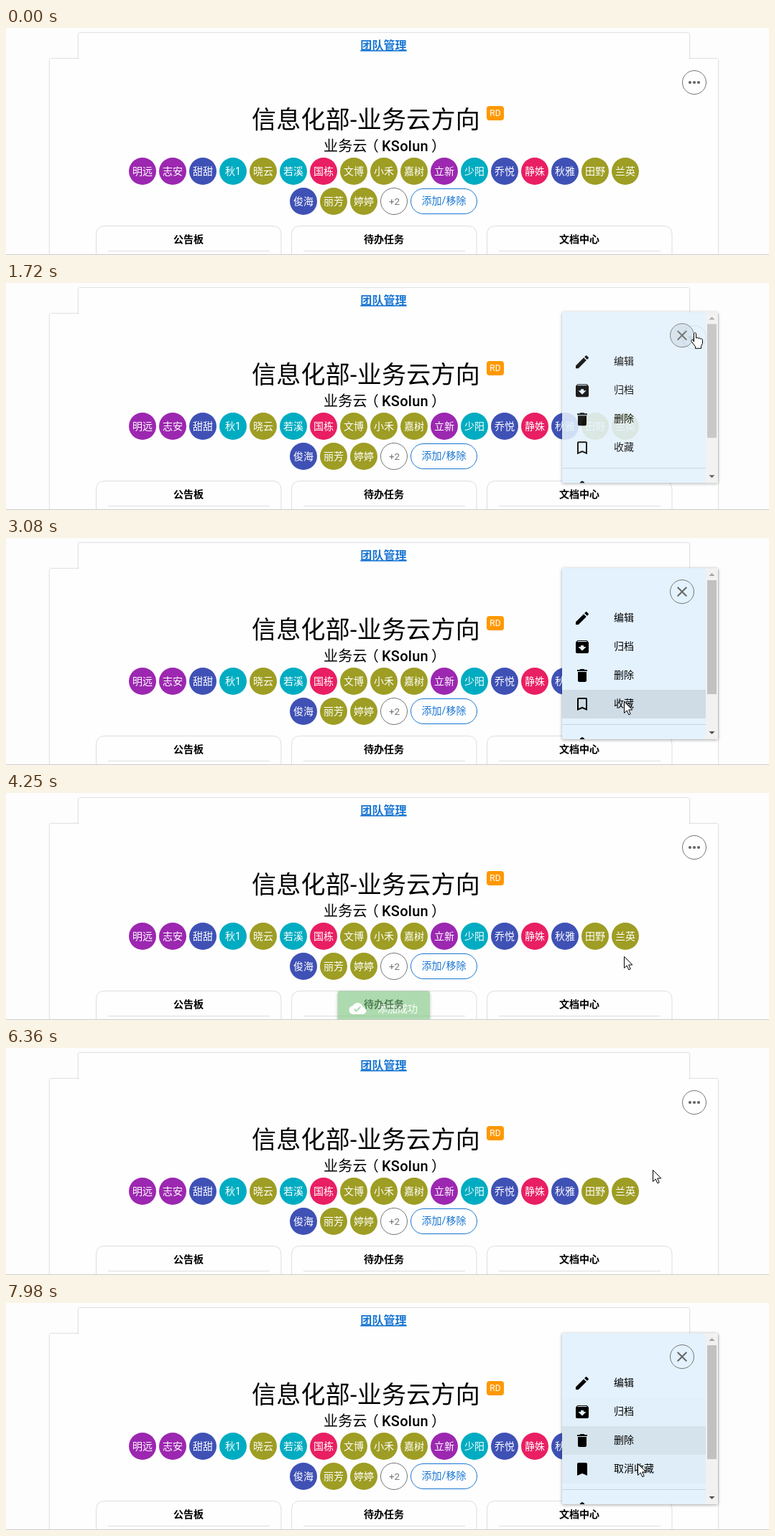
Write an HTML page that moves like this. It is 1062 px wide and 317 px high and loops after 8000 ms.

```html
<!DOCTYPE html>
<html lang="zh-CN">
<head>
<meta charset="utf-8">
<title>团队管理</title>
<style>
html, body { margin: 0; width: 100%; height: 100%; overflow: hidden; background: #fdfdfd; }
svg { display: block; width: 100%; height: 100%; font-family: Roboto, "Noto Sans CJK SC", "Noto Sans CJK", sans-serif; }
.sheet { filter: drop-shadow(0 0 1px rgba(0,0,0,.3)); }
.float { filter: drop-shadow(0 1px 2px rgba(0,0,0,.35)); }
</style>
</head>
<body>
<svg id="stage" viewBox="0 0 1062 317"></svg>
<script>
const stage = document.getElementById('stage');

const PATHS = {
  edit: 'M3 17.25V21h3.75L17.81 9.94l-3.75-3.75zM20.71 7.04c.39-.39.39-1.02 0-1.41l-2.34-2.34c-.39-.39-1.02-.39-1.41 0l-1.83 1.83 3.75 3.75z',
  archive: 'M20.54 5.23l-1.39-1.68C18.88 3.21 18.47 3 18 3H6c-.47 0-.88.21-1.16.55L3.46 5.23C3.17 5.57 3 6.02 3 6.5V19c0 1.1.9 2 2 2h14c1.1 0 2-.9 2-2V6.5c0-.48-.17-.93-.46-1.27zM12 17.5L6.5 12H10v-2h4v2h3.5zM5.12 5l.81-1h12l.94 1z',
  trash: 'M6 19c0 1.1.9 2 2 2h8c1.1 0 2-.9 2-2V7H6zM19 4h-3.5l-1-1h-5l-1 1H5v2h14z',
  mark: 'M17 3H7c-1.1 0-2 .9-2 2v16l7-3 7 3V5c0-1.1-.9-2-2-2z',
  markHole: 'M17 18l-5-2.18L7 18V5h10z',
  close: 'M19 6.41L17.59 5 12 10.59 6.41 5 5 6.41 10.59 12 5 17.59 6.41 19 12 13.41 17.59 19 19 17.59 13.41 12z',
  cloud: 'M19.35 10.04C18.67 6.59 15.64 4 12 4 9.11 4 6.6 5.64 5.35 8.04 2.34 8.36 0 10.91 0 14c0 3.31 2.69 6 6 6h13c2.76 0 5-2.24 5-5 0-2.64-2.05-4.78-4.65-4.96zM10 17l-3.5-3.5 1.41-1.41L10 14.17 15.18 9l1.41 1.41z'
};

const COLORS = { p: '#9c27b0', i: '#3f51b5', c: '#00acc1', o: '#9e9d24', r: '#e91e63' };
const MEMBERS = '明远p 志安p 甜甜i 秋1c 晓云o 若溪c 国栋r 文博o 小禾o 嘉树o 立新p 少阳c 乔悦i 静姝r 秋雅i 田野o 兰英o 俊海i 丽芳o 婷婷o'.split(' ');

const text = (s, x, cy, size, fill = '#000', more = 'text-anchor="middle"') =>
  `<text x="${x}" y="${cy + size * .37}" font-size="${size}" fill="${fill}" ${more}>${s}</text>`;
const circle = (x, y, r, more) => `<circle cx="${x}" cy="${y}" r="${r}" ${more}/>`;
const rect = (x, y, w, h, more) => `<rect x="${x}" y="${y}" width="${w}" height="${h}" ${more}/>`;
const icon = (d, x, y, fill = '#000', id = '') =>
  `<path ${id} d="${d}" fill="${fill}" fill-rule="evenodd" transform="translate(${x - 12} ${y - 12})"/>`;
const line = (x1, x2, y, color) => rect(x1, y, x2 - x1, 1, `fill="${color}"`);

function member(entry, n) {
  const x = n < 17 ? 190 + 42 * n : 414 + 42 * (n - 17);
  const y = n < 17 ? 200 : 242;
  return circle(x, y, 19, `fill="${COLORS[entry.at(-1)]}"`) +
    text(entry.slice(0, -1), x, y - .5, 14, '#fff');
}

function card(title, n) {
  const x = 125.5 + 272 * n;
  return `<path d="M${x} 317V288.5q0-12 12-12h233.5q12 0 12 12V317" fill="#fefefe" stroke="#ddd"/>` +
    text(title, x + 128.5, 295, 14, '#000', 'text-anchor="middle" font-weight="700"') +
    line(x + 16.5, x + 241.5, 311, '#ddd');
}

const page =
  '<path class="sheet" d="M61 330V45q0-2 2-2H101V9q0-2 2-2H949q2 0 2 2V43H989q2 0 2 2V330z" fill="#fefefe"/>' +
  text('团队管理', 525.5, 24, 16.1, '#1976d2', 'text-anchor="middle" font-weight="700" text-decoration="underline"') +
  circle(958, 76, 16.5, 'id="more" fill="#000" fill-opacity="0" stroke="#757575"') +
  [952, 958, 964].map(x => circle(x, 76, 2.1, 'fill="#666"')).join('') +
  text('信息化部-业务云方向', 342, 127.5, 34, '#000', 'letter-spacing=".25"') +
  rect(669, 109, 24, 20, 'rx="4" fill="#ff9800"') +
  text('RD', 681, 119, 12, '#fff') +
  text('业务云<tspan dx="-4">（</tspan><tspan dx="4" font-weight="500">KSolun</tspan><tspan dx="4">）</tspan>',
    442, 165, 20, '#000', 'letter-spacing=".25"') +
  MEMBERS.map(member).join('') +
  circle(540, 242, 18.5, 'fill="none" stroke="#757575"') +
  text('+2', 540.5, 242.5, 13.5, '#757575') +
  rect(563.5, 224.5, 92, 35, 'rx="17.5" fill="none" stroke="#1976d2"') +
  text('添加/移除', 609.5, 241, 14, '#1976d2') +
  ['公告板', '待办任务', '文档中心'].map(card).join('');

const ROWS = [['编辑', PATHS.edit], ['归档', PATHS.archive], ['删除', PATHS.trash], ['收藏', PATHS.mark]];
const rowTop = n => 92 + 40 * n;

const menu =
  rect(774, 42, 217, 239, 'class="float" rx="2" fill="#e3f2fd"') +
  circle(941, 75, 16.5, 'id="close" fill="#000" fill-opacity="0" stroke="#757575"') +
  icon(PATHS.close, 941, 75, '#666') +
  ROWS.map(([name, d], n) =>
    rect(774, rowTop(n), 200, 40, `id="row${n}"`) +
    icon(d, 802, rowTop(n) + 20, '#000', n == 3 ? 'id="mark"' : '') +
    text(name, 846, rowTop(n) + 19, 14, '#000', n == 3 ? 'id="markText"' : '')).join('') +
  line(774, 974, 260, '#c6d3dd') +
  '<path d="M798.5 281q1-2 3.5-3 2.5 1 3.5 3z"/>' +
  rect(974, 42, 17, 239, 'fill="#f1f1f1"') +
  rect(976, 59, 13, 159, 'fill="#c1c1c1"') +
  '<path d="M978.5 53l4-4 4 4z" fill="#a3a3a3"/><path d="M978.5 270l4 4 4-4z" fill="#505050"/>';

const toast =
  rect(461.5, 258.5, 128.5, 48.5, 'class="float" rx="4" fill="#81c784"') +
  icon(PATHS.cloud, 489.5, 283, '#fff') +
  text('添加成功', 517, 282.5, 14, '#fff', '');

stage.innerHTML = page +
  `<g id="menu">${menu}</g><g id="toast">${toast}</g>` +
  line(0, 1062, 316, '#ccc') +
  `<g id="cursor" fill="#fff" stroke="#000" stroke-linejoin="round">
    <path id="arrow" d="M.5 .5V16.5L4.2 13l2.6 5.8 2.4-1L6.7 12H11.8z"/>
    <path id="hand" transform="translate(-6 0)" d="M4.5 13V2c0-2 3-2 3 0v6c0-1 3-1 3 .5 0-1 3-.7 3 .8 0-1 3-.6 3 1v5l-2 4v3H6.5v-2.5L1 12.5c-1-2 1-3 2-2z"/>
  </g>`;

const el = id => document.getElementById(id);
const set = (id, name, value) => el(id).setAttribute(name, value);
const easeOut = p => 1 - (1 - Math.min(1, Math.max(0, p))) ** 3;

// time, x, y of the pointer
const TRAIL = [
  [480, 630, 318], [650, 730, 245], [850, 850, 155], [1000, 925, 95], [1130, 959, 69],
  [1860, 959, 69], [2050, 932, 110], [2200, 900, 155], [2350, 877, 190], [2450, 866, 214], [2560, 860, 228],
  [6100, 860, 228], [6230, 876, 205], [6360, 900, 170], [6540, 929, 132], [6700, 950, 95], [6840, 959, 74],
  [7430, 959, 74], [7560, 935, 120], [7690, 908, 168], [7920, 884, 212], [7980, 879, 224]
];

function pointer(t) {
  const n = TRAIL.findIndex(k => k[0] > t);
  if (n == 0) return [630, 340];
  if (n < 0) return TRAIL.at(-1).slice(1);
  const [a, b] = [TRAIL[n - 1], TRAIL[n]];
  const p = (t - a[0]) / (b[0] - a[0]);
  return [a[1] + (b[1] - a[1]) * p, a[2] + (b[2] - a[2]) * p];
}

const menuLevel = t =>
  t < 3550 ? easeOut((t - 1570) / 300) :
  t < 7000 ? 1 - easeOut((t - 3550) / 300) : easeOut((t - 7130) / 300);
const toastLevel = t => t < 5750 ? easeOut((t - 4020) / 800) : 1 - easeOut((t - 5750) / 800);

// share of the last 300 ms that the pointer spent on a row
function hoverLevel(n, t) {
  let hits = 0;
  for (let k = 1; k <= 10; k++) {
    const y = pointer(t - 30 * k)[1];
    if (y >= rowTop(n) && y < rowTop(n + 1)) hits++;
  }
  return hits / 10;
}

function place(id, level, shift) {
  set(id, 'opacity', level);
  set(id, 'transform', `translate(0 ${shift * (1 - level)})`);
}

function draw(t) {
  const [x, y] = pointer(t);
  const open = menuLevel(t);
  place('menu', open, -15);
  place('toast', toastLevel(t), 50);
  ROWS.forEach((_, n) => set('row' + n, 'fill-opacity', .09 * hoverLevel(n, t)));

  const saved = t > 4000;
  set('mark', 'd', PATHS.mark + (saved ? '' : PATHS.markHole));
  el('markText').textContent = saved ? '取消收藏' : '收藏';

  const onMore = open == 0 && Math.hypot(x - 958, y - 76) < 17;
  const onClose = open > 0 && Math.hypot(x - 941, y - 75) < 21;
  set('more', 'fill-opacity', onMore ? .07 : 0);
  set('close', 'fill-opacity', onClose ? .07 : 0);
  set('hand', 'opacity', +(onMore || onClose));
  set('arrow', 'opacity', +!(onMore || onClose));
  set('cursor', 'transform', `translate(${Math.round(x)} ${Math.round(y)})`);
}

const start = performance.now();
function tick() {
  draw((performance.now() - start) % 8000);
  requestAnimationFrame(tick);
}
tick();
</script>
</body>
</html>
```
